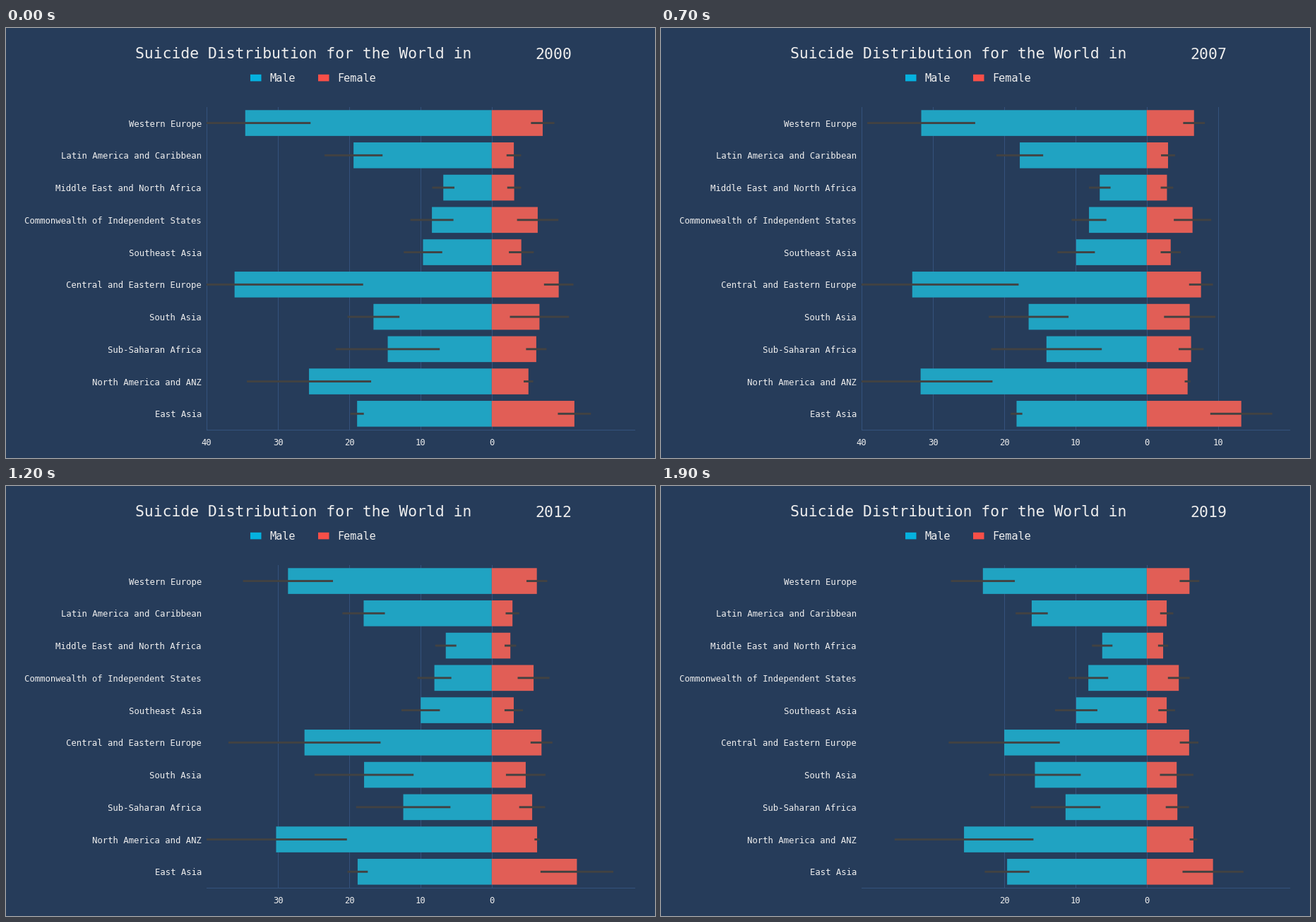
Recreate the animation shown at these times as a matplotlib script. Size 919 by 609 pixels, loop 2000 ms.

```python
import math

import matplotlib.pyplot as plt
import numpy as np
from matplotlib.animation import FuncAnimation
from matplotlib.patches import Rectangle

W, H = 919, 609
DPI = 100
BG, INK, LINE = "#263c5a", "#eeeeee", "#34527c"
MALE, FEMALE, ERR = "#20a3c2", "#e15e56", "#424242"
MALE_KEY, FEMALE_KEY = "#05b1df", "#f84f48"
START, COUNT = 2000, 20

plt.rcParams["font.family"] = "DejaVu Sans Mono"


def pt(px):
    return px * 72 / DPI


def trend(*points):
    """Yearly values along straight runs between evenly spaced points."""
    knots = np.linspace(0, COUNT - 1, len(points))
    return np.interp(np.arange(COUNT), knots, points)


class Side:
    """Bars of one sex; error bars reach a share of the mean to both sides."""

    def __init__(self, sign, color):
        self.sign, self.color = sign, color
        self.means, self.shares = [], []

    def add(self, mean, share):
        self.means.append(self.sign * mean)
        self.shares.append(share)

    def plot(self, ax, rows):
        self.bars = ax.barh(rows, 0 * rows, 0.8, color=self.color, lw=0, snap=False)
        self.errs = ax.hlines(rows, 0, 0, color=ERR, lw=pt(2.9), zorder=3)
        self.errs.set_snap(False)

    def update(self, i):
        """Move to year i and return the farthest error end."""
        ends = []
        segments = []
        for y, (bar, mean, share) in enumerate(zip(self.bars, self.means, self.shares)):
            m, s = mean[i], share[i]
            bar.set_width(m)
            segments.append([(m * (1 - s), y), (m * (1 + s), y)])
            ends.append(m * (1 + s))
        self.errs.set_segments(segments)
        return max(ends, key=abs)


names = []
men, women = Side(-1, MALE), Side(1, FEMALE)


def region(name, male, male_share, female, female_share):
    names.append(name)
    men.add(male, male_share)
    women.add(female, female_share)


region("Western Europe",
       trend(34.6, 30.6, 23.0), trend(0.265, 0.195),
       trend(7.15, 6.45, 6.0), trend(0.23))
region("Latin America and Caribbean",
       trend(19.4, 17.8, 18.0, 16.15), trend(0.21, 0.14),
       trend(3.1, 2.8), trend(0.33))
region("Middle East and North Africa",
       trend(6.8, 6.25), trend(0.23),
       trend(3.15, 2.3), trend(0.31))
region("Commonwealth of Independent States",
       trend(8.4, 8.0, 8.2), trend(0.36, 0.28, 0.34),
       trend(6.45, 6.5, 5.8, 4.5), trend(0.45, 0.34))
region("Southeast Asia",
       trend(9.65, 10.0, 9.9), trend(0.28, 0.26, 0.3),
       trend(4.15, 3.4, 3.05, 2.8), trend(0.42))
region("Central and Eastern Europe",
       trend(36.1, 33.8, 25.4, 20.0), trend(0.5, 0.46, 0.4, 0.39),
       trend(9.4, 7.7, 6.9, 5.95), trend(0.22))
region("South Asia",
       trend(16.6, 16.4, 18.1, 15.7), trend(0.22, 0.38, 0.41),
       trend(6.7, 6.2, 4.6, 4.2), trend(0.62, 0.56))
region("Sub-Saharan Africa",
       trend(14.6, 14.3, 12.2, 11.4), trend(0.5, 0.57, 0.43),
       trend(6.25, 6.3, 5.6, 4.3), trend(0.23, 0.3, 0.38))
region("North America and ANZ",
       trend(25.65, 30.7, 32.9, 27.9, 25.65), trend(0.34, 0.31, 0.38),
       trend(5.15, 5.65, 6.45, 6.55), trend(0.13, 0.05, 0.08))
region("East Asia",
       trend(18.9, 18.2, 18.9, 19.6), trend(0.05, 0.04, 0.08, 0.16),
       trend(11.6, 12.7, 13.9, 10.2, 9.3), trend(0.2, 0.2, 0.47, 0.39, 0.46))

fig = plt.figure(figsize=(W / DPI, H / DPI), dpi=DPI, facecolor=BG)
LEFT, RIGHT, TOP, BOTTOM = 284.3, 889.6, 111.7, 569.2
ax = fig.add_axes([LEFT / W, 1 - BOTTOM / H, (RIGHT - LEFT) / W, (BOTTOM - TOP) / H],
                  facecolor=BG)
rows = np.arange(len(names))
ax.set_xlim(-40, 20)
ax.set_ylim(len(names) - 0.5, -0.5)
ax.set_axisbelow(True)
ax.grid(axis="x", color=LINE, lw=pt(1))
for edge in ("left", "right", "top"):
    ax.spines[edge].set_visible(False)
ax.spines["bottom"].set(color=LINE, lw=pt(1))
ax.tick_params(length=0, labelsize=pt(12.2), labelcolor=INK)
ax.tick_params(axis="x", pad=pt(12.2))
ax.tick_params(axis="y", pad=pt(7.3))
ax.set_yticks(rows, names)
for side in (men, women):
    side.plot(ax, rows)


def label(x, y, text, size):
    return fig.text(x / W, 1 - y / H, text, size=pt(size), color=INK,
                    ha="left", va="baseline")


def legend_key(x, text, color):
    fig.add_artist(Rectangle((x / W, 1 - 75.4 / H), 15.5 / W, 9.6 / H,
                             color=color, lw=0, snap=False))
    label(x + 27.2, 76, text, 15.3)


label(183, 43, "Suicide Distribution for the World in", 21.4)
year_text = label(749.5, 44.5, "", 21.5)
legend_key(346, "Male", MALE_KEY)
legend_key(442, "Female", FEMALE_KEY)


def ticks(lo, hi):
    """Tens around the padded data range, less two at either end."""
    pad = 0.05 * (hi - lo)
    first = 10 * math.floor((lo - pad) / 10) + 20
    last = 10 * math.ceil((hi + pad) / 10) - 20
    return np.arange(first, last + 1, 10)


def draw(i):
    tens = ticks(men.update(i), women.update(i))
    ax.set_xticks(tens, [str(abs(t)) for t in tens])
    year_text.set_text(str(START + i))
    return []


anim = FuncAnimation(fig, draw, frames=COUNT, interval=100, init_func=lambda: draw(0),
                     repeat=True, repeat_delay=0, blit=False)
plt.show()
```
